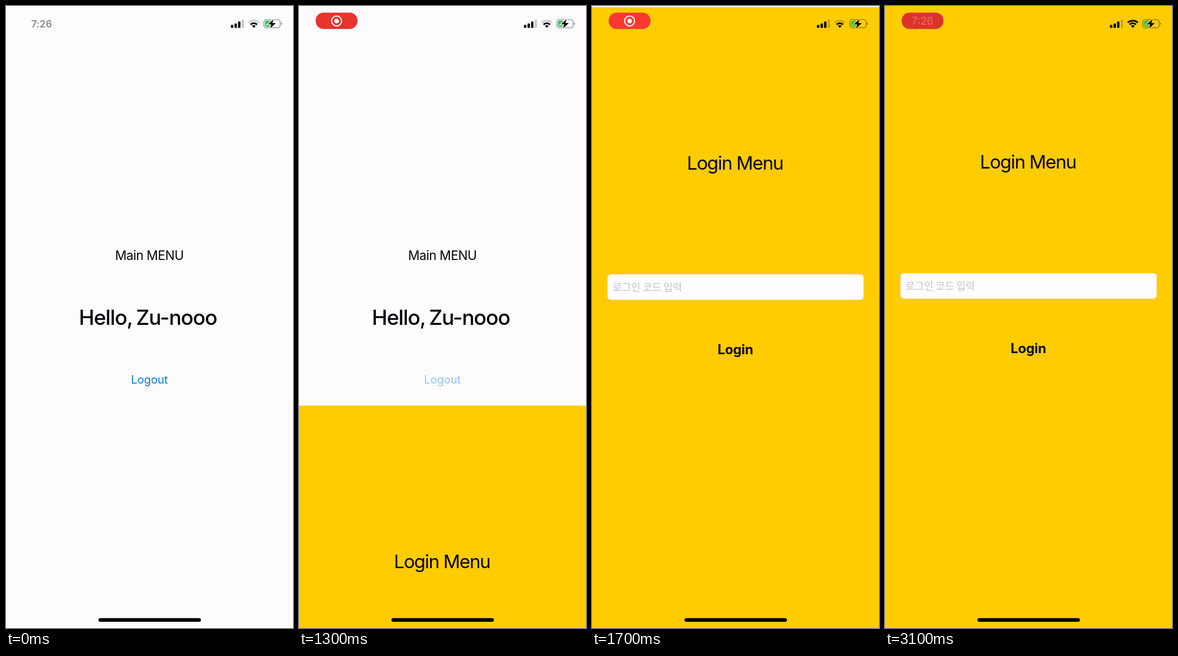
Recreate the animation shown at these times as an HTML page. Size 508x1102 px, loop 3200 ms.

```html
<!DOCTYPE html>
<html lang="en">
<head>
<meta charset="utf-8">
<title>Login and logout screens</title>
<style>
  html, body { margin: 0; width: 100%; height: 100%; overflow: hidden; background: #fefcff; }
  svg { display: block; width: 100vw; height: 100vh; }
  text { font-family: Inter, Roboto, sans-serif; font-optical-sizing: none; fill: #050308; }
  .mid { text-anchor: middle; }
  .hint { font-family: "Noto Sans CJK KR", "Noto Sans CJK", sans-serif; font-size: 17.9px; fill: #c3c1c6; }
</style>
</head>
<body>
<svg viewBox="0 0 508 1102">
  <defs>
    <mask id="boltGap">
      <rect x="450" y="15" width="45" height="32" fill="#fff"/>
      <path d="M473.5 23.5L463.5 32.5H469.5L467.5 39.8L477.5 30.2H471.5Z" fill="#000" stroke="#000" stroke-width="3"/>
    </mask>
  </defs>

  <g id="main">
    <rect width="508" height="1102" fill="#fefcff"/>
    <text class="mid" x="253.8" y="449.5" font-size="22.4" letter-spacing="-.42">Main MENU</text>
    <text x="129" y="565" font-size="37" font-weight="500" letter-spacing="-1.12" word-spacing="-2">Hello, Zu-nooo</text>
    <text class="mid" id="logout" x="253.8" y="669" font-size="20" letter-spacing="-.15" style="fill:#0a7ae0">Logout</text>
  </g>

  <g id="sheet">
    <rect width="508" height="1110" fill="#ffcc02"/>
    <text class="mid" x="253.2" y="287.6" font-size="33" letter-spacing="-1.33">Login Menu</text>
    <rect x="27.5" y="473.5" width="453.3" height="45" rx="6" fill="#fffdff" stroke="#eadfbd"/>
    <text class="hint" x="36.3" y="502.6">로그인 코드 입력</text>
    <text class="mid" x="253.8" y="615" font-size="23.7" font-weight="700" letter-spacing="-.15">Login</text>
  </g>

  <g id="status">
    <text class="mid" id="clock" x="62.9" y="37.6" font-size="17.6" font-weight="600" letter-spacing="-.1" style="fill:#8b8a8d">7:26</text>
    <g id="pill">
      <rect id="pillBody" x="29.5" y="11.7" width="74" height="29.1" rx="14"/>
      <g id="record">
        <circle cx="66.5" cy="26.6" r="8.8" fill="none" stroke="#fff" stroke-width="2"/>
        <circle cx="66.5" cy="26.6" r="4" fill="#fff"/>
      </g>
      <text class="mid" id="pillTime" x="66.3" y="33.3" font-size="18.8" style="fill:#ef6d66">7:26</text>
    </g>

    <rect x="398.2" y="33.6" width="4.2" height="5.2" rx="1"/>
    <rect x="404.5" y="31" width="4.2" height="7.8" rx="1"/>
    <rect x="410.8" y="27.6" width="4.2" height="11.2" rx="1"/>
    <rect x="417.1" y="24" width="4.2" height="14.8" rx="1" opacity=".2"/>

    <g id="wifi" fill="none" stroke="#000"></g>

    <g mask="url(#boltGap)">
      <rect x="456.4" y="24.1" width="28.8" height="14.6" rx="4.3" fill="none" stroke="#000" stroke-opacity=".45" stroke-width="1.3"/>
      <path d="M486.8 29.2q1.8 .6 1.8 2.2t-1.8 2.2z" opacity=".5"/>
      <rect x="458.4" y="26.1" width="12.4" height="10.6" rx="2.5" fill="#32c35a"/>
    </g>
    <path d="M473.5 23.5L463.5 32.5H469.5L467.5 39.8L477.5 30.2H471.5Z"/>
  </g>

  <rect x="163.6" y="1084.4" width="181.4" height="6.6" rx="3.3"/>
</svg>

<script>
  const LOOP = 3200, STEP = 100;
  const $ = id => document.getElementById(id);

  // Wi-Fi bands share one centre at the bottom tip.
  function band(radius, width) {
    const a = 0.76, dx = radius * Math.sin(a), dy = radius * Math.cos(a);
    const path = document.createElementNS('http://www.w3.org/2000/svg', 'path');
    path.setAttribute('d', `M${438.6 - dx} ${38.8 - dy}A${radius} ${radius} 0 0 1 ${438.6 + dx} ${38.8 - dy}`);
    path.setAttribute('stroke-width', width);
    $('wifi').append(path);
    return path;
  }
  const outerBand = band(12.9, 3);
  band(8.2, 3);
  band(2.4, 4.8);

  // Value of the last entry [time, value] that has been reached.
  const at = (table, t) => table.reduce((v, [start, next]) => t >= start ? next : v, table[0][1]);

  const pillAlpha = [[0, 0], [100, .4], [200, .8], [300, 1]];
  const clockAlpha = [[0, 1], [100, .4], [200, 0]];
  const logoutAlpha = [[0, 1], [1200, .3], [1300, .43]];
  const recordAlpha = [[0, 1], [3000, .4], [3100, 0]];
  const timeAlpha = [[0, 0], [3100, 1]];
  const wifiAlpha = [[0, .2], [2800, 1]];

  // Critically damped spring from the bottom edge to the top.
  function sheetTop(t) {
    const x = 18.15 * (t - 1230.8) / 1000;
    return x <= 0 ? 1110 : Math.round(1102 * (1 + x) * Math.exp(-x));
  }

  function pillColor(t) {
    const c = Math.cos(2 * Math.PI * (t - 1900) / 2000);
    return `rgb(${236 + 19 * c},${54 + 4 * c},${47 + 2 * c})`;
  }

  function draw(ms) {
    const t = Math.floor(ms % LOOP / STEP) * STEP;
    const fade = (node, table) => node.setAttribute('opacity', at(table, t));
    $('sheet').setAttribute('transform', `translate(0 ${sheetTop(t)})`);
    $('pillBody').setAttribute('fill', pillColor(t));
    fade($('pill'), pillAlpha);
    fade($('clock'), clockAlpha);
    fade($('logout'), logoutAlpha);
    fade($('record'), recordAlpha);
    fade($('pillTime'), timeAlpha);
    fade(outerBand, wifiAlpha);
  }

  const start = performance.now();
  function tick() {
    draw(performance.now() - start);
    requestAnimationFrame(tick);
  }
  tick();
</script>
</body>
</html>
```
